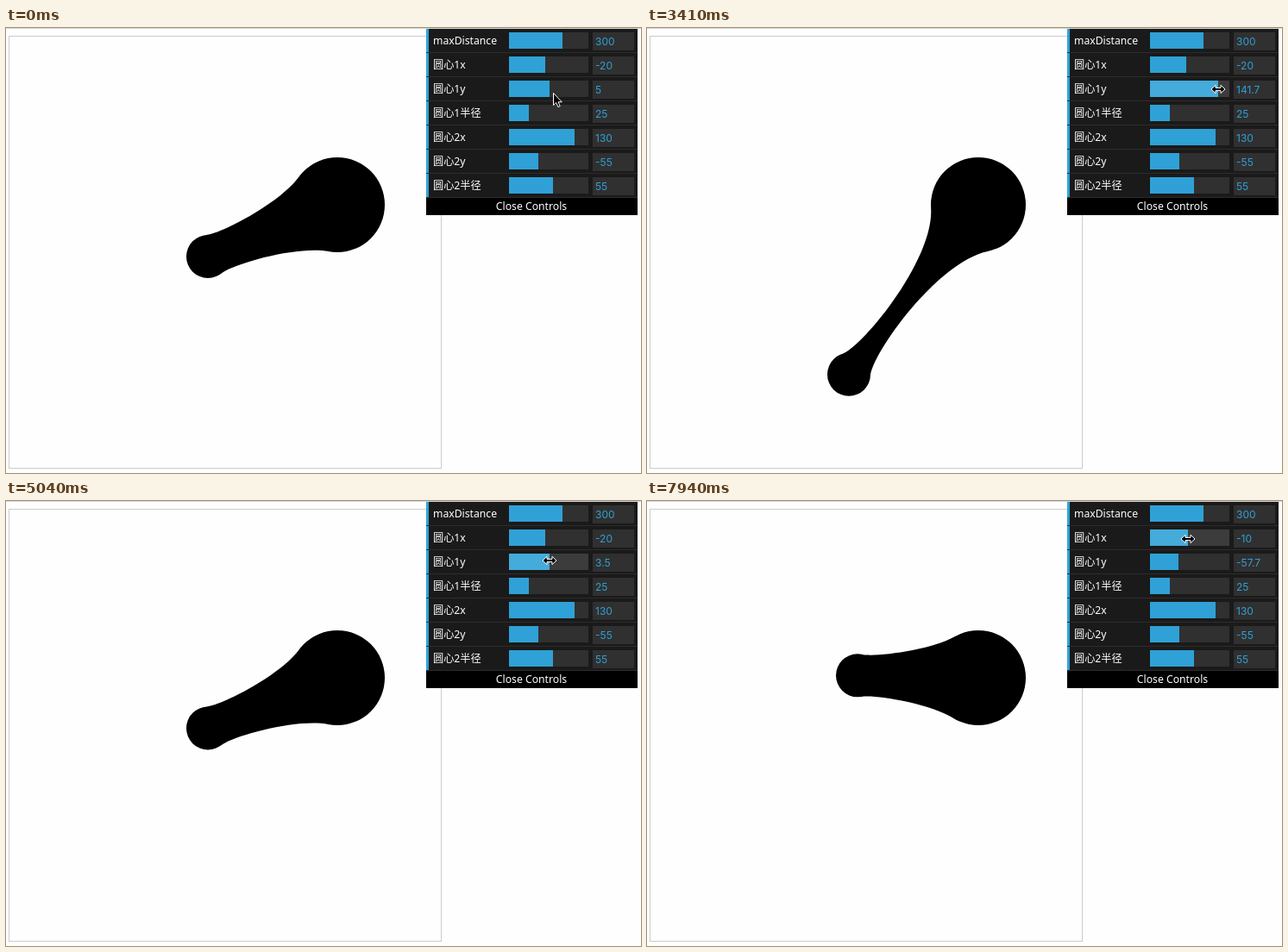
Animation, 736 px wide and 516 px high, one loop 8000 ms. Source, as an HTML page:

```html
<!DOCTYPE html>
<html lang="zh">
<head>
<meta charset="utf-8">
<title>Metaball controls</title>
<style>
  html, body { margin: 0; width: 100%; height: 100%; overflow: hidden; background: #fefefe; }
  svg { display: block; }
  .label { font: 500 12.2px "Noto Sans", "Noto Sans CJK SC", "Noto Sans CJK JP", sans-serif; fill: #fff; }
  .value { font: 12px Inter, sans-serif; fill: #2fa1d6; }
  .track { fill: #303030; }
  .bar { fill: #2fa1d6; }
  .hover .track { fill: #3c3c3c; }
  .hover .bar { fill: #44abda; }
  .cursor { fill: #000; stroke: #fff; stroke-width: 1; stroke-linejoin: round; }
</style>
</head>
<body>
<svg id="stage" width="736" height="516" viewBox="0 0 736 516">
  <rect width="736" height="1" fill="#d6d6d6"/>
  <rect x="3.5" y="9.5" width="501" height="501" fill="none" stroke="#ccc"/>
  <path id="blob"/>
  <rect x="487" y="1" width="245" height="216" fill="#000"/>
  <g id="rows"></g>
  <text class="label" x="609" y="211" text-anchor="middle">Close Controls</text>
  <path id="arrow" class="cursor" d="M.5 .5V14.6L3.7 11.6 5.9 16.6 8.2 15.6 6 10.8H10.3Z"/>
  <path id="resize" class="cursor" d="M-8 0L-3-4.7V-1.6H3V-4.7L8 0 3 4.7V1.6H-3V4.7Z"/>
</svg>
<script>
const LOOP = 8000;
const STEP = 86;
const MAX_DIST = 300;
const RANGE = 200;
const SLIDER = { x: 583, w: 92 };
const CENTER = { x: 254, y: 260 };
const BIG = { x: CENTER.x + 130, y: CENTER.y - 55 };
const $ = id => document.getElementById(id);

function add(parent, tag, attrs, text) {
  const el = document.createElementNS('http://www.w3.org/2000/svg', tag);
  for (const k in attrs) el.setAttribute(k, attrs[k]);
  if (text) el.textContent = text;
  parent.append(el);
  return el;
}

const barWidth = (v, min, max) => Math.round(SLIDER.w * (v - min) / (max - min) + 0.2);

function makeRow(i, name, min, max, value) {
  const y = 1 + 28 * i;
  const g = add($('rows'), 'g', {});
  add(g, 'rect', { x: 487, y, width: 245, height: 27, fill: '#1a1a1a' });
  add(g, 'rect', { x: 487, y, width: 3, height: 27, fill: '#2fa1d6' });
  add(g, 'rect', { x: 487, y: y + 27, width: 245, height: 1, fill: '#2c2c2c' });
  add(g, 'text', { class: 'label', x: 495, y: y + 18 }, name);
  add(g, 'rect', { class: 'track', x: SLIDER.x, y: y + 4, width: SLIDER.w, height: 19 });
  const bar = add(g, 'rect', { class: 'bar', x: SLIDER.x, y: y + 4, height: 19 });
  add(g, 'rect', { x: 680, y: y + 4, width: 48, height: 21, fill: '#303030' });
  const text = add(g, 'text', { class: 'value', x: 683, y: y + 19 });
  const row = {
    set(v) {
      bar.setAttribute('width', barWidth(v, min, max));
      text.textContent = Math.round(v * 10) / 10;
    },
    hover(on) { g.setAttribute('class', on ? 'hover' : ''); },
    contains: cy => cy >= y + 4 && cy < y + 23
  };
  row.set(value);
  return row;
}

const [, rowX, rowY] = [
  ['maxDistance', 0, 450, MAX_DIST],
  ['圆心1x', -RANGE, RANGE, -20],
  ['圆心1y', -RANGE, RANGE, 5],
  ['圆心1半径', 0, 100, 25],
  ['圆心2x', -RANGE, RANGE, 130],
  ['圆心2y', -RANGE, RANGE, -55],
  ['圆心2半径', 0, 100, 55]
].map((r, i) => makeRow(i, ...r));

// A track runs through moves [start, end, goal] in even steps about STEP ms apart
const track = (start, ...moves) => t => moves.reduce((v, [t0, t1, goal]) => {
  if (t < t0) return v;
  const n = Math.round((t1 - t0) / STEP) + 1;
  const done = t >= t1 ? n : Math.floor((t - t0) / (t1 - t0) * (n - 1)) + 1;
  return v + (goal - v) * done / n;
}, start);

const ARRIVE = 1390, HOVER = 1440, GRAB = 2090, RELEASE = 7280;

const ballY = track(5, [GRAB, GRAB, 30],
  [2630, 2860, 59.3], [2980, 3410, 141.7], [3500, 3760, 200], [3970, 4060, 107],
  [4300, 4390, 76.6], [4450, 5040, 3.5], [5130, 5400, -31],
  [5670, 5760, -36.1], [6840, 6920, -57.7]);
const ballX = track(-20, [7860, 7940, -10]);
const handX = track(634, [60, 400, 627], [640, 640, 626], [ARRIVE, ARRIVE, 639],
  [1680, 1730, 636], [GRAB, GRAB, 616], [RELEASE, 7780, 627]);
const handY = track(75, [60, 200, 62], [260, 400, 74], [640, 640, 73],
  [ARRIVE, ARRIVE, 71], [1680, 1730, 73], [GRAB, 5760, 68], [RELEASE, 7780, 44]);

const polar = (p, a, r) => ({ x: p.x + r * Math.cos(a), y: p.y + r * Math.sin(a) });
const pt = p => p.x.toFixed(2) + ' ' + p.y.toFixed(2);
const disc = (c, r) =>
  `M${c.x - r} ${c.y}a${r} ${r} 0 1 1 ${2 * r} 0a${r} ${r} 0 1 1 ${-2 * r} 0Z`;

// Two discs joined by curves that leave each disc along its tangent
function metaball(c1, r1, c2, r2) {
  const dx = c2.x - c1.x, dy = c2.y - c1.y;
  const d = Math.hypot(dx, dy), near = d / MAX_DIST;
  const axis = Math.atan2(dy, dx);
  const spread = Math.acos((r1 - r2) / d);
  const v = 1 - near / 2, pull = 1.3 * near;
  const side = s => {
    const a1 = axis + s * spread * v;
    const a2 = axis + s * (Math.PI - (Math.PI - spread) * v);
    const p1 = polar(c1, a1, r1), p2 = polar(c2, a2, r2);
    return [p1, polar(p1, a1 - s * Math.PI / 2, r1 * pull),
            polar(p2, a2 + s * Math.PI / 2, r2 * pull), p2].map(pt);
  };
  const [a, b, c, e] = side(-1), [f, g, h, k] = side(1);
  return disc(c1, r1) + disc(c2, r2) + `M${a}C${b} ${c} ${e}L${k}C${h} ${g} ${f}Z`;
}

function draw(now) {
  const t = now % LOOP;
  const x = ballX(t), y = ballY(t);
  const dragging = t >= GRAB && t < RELEASE;
  const cx = dragging ? SLIDER.x + barWidth(y, -RANGE, RANGE) : Math.round(handX(t));
  const cy = Math.round(handY(t));

  let resizing = false;
  for (const [row, value] of [[rowX, x], [rowY, y]]) {
    const over = row.contains(cy);
    row.set(value);
    row.hover(over && t >= HOVER);
    resizing ||= over && t >= ARRIVE;
  }
  for (const [id, on] of [['arrow', !resizing], ['resize', resizing]]) {
    $(id).setAttribute('transform', `translate(${cx} ${cy})`);
    $(id).setAttribute('visibility', on ? 'visible' : 'hidden');
  }
  $('blob').setAttribute('d', metaball({ x: CENTER.x + x, y: CENTER.y + y }, 25, BIG, 55));
}

const begin = performance.now();
function tick() {
  draw(performance.now() - begin);
  requestAnimationFrame(tick);
}
tick();
</script>
</body>
</html>
```
